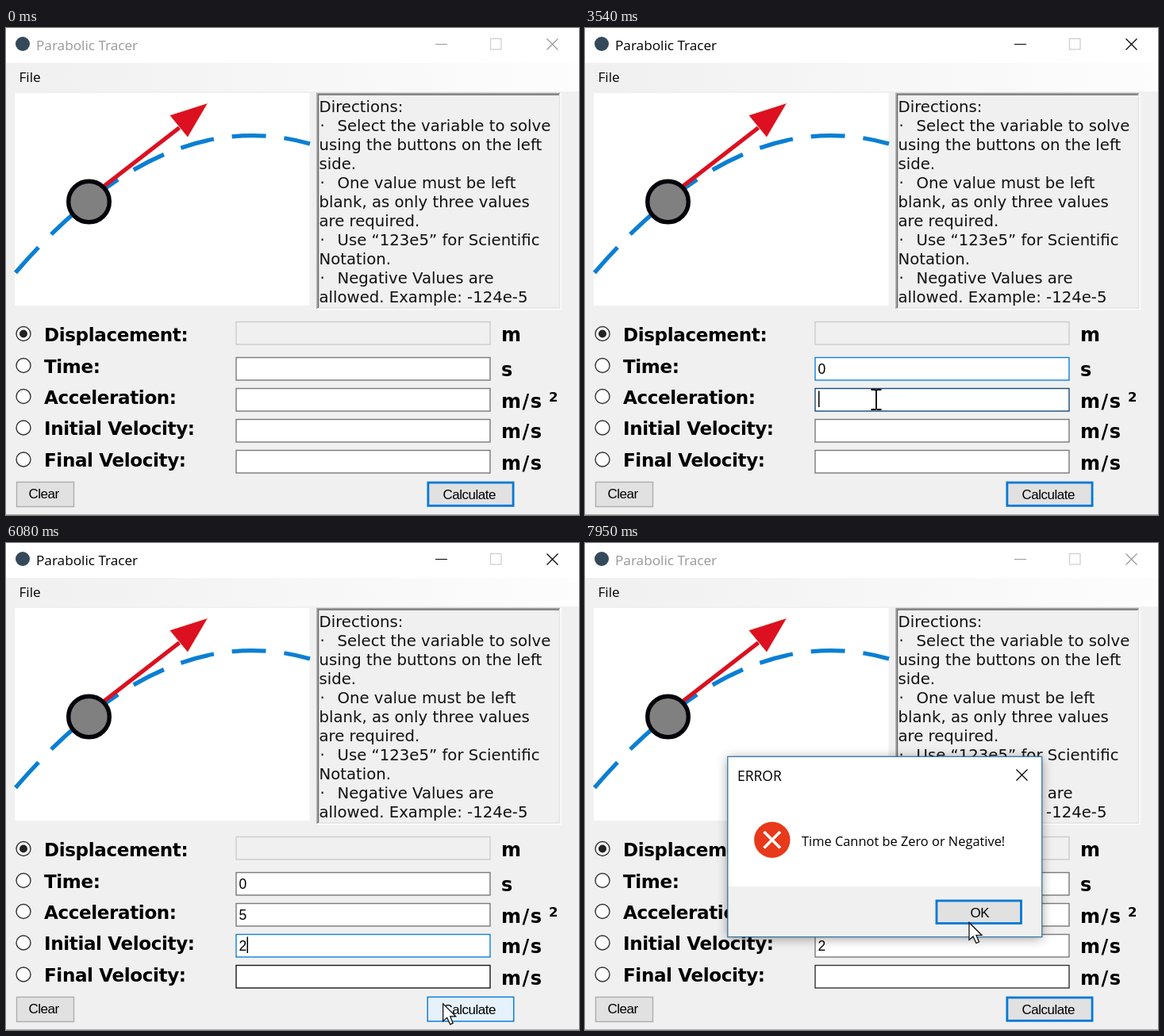
An HTML page for the animation above (8000 ms loop, 722 by 614 pixels).

```html
<!DOCTYPE html>
<html lang="en">
<head>
<meta charset="utf-8">
<title>Parabolic Tracer</title>
<style>
  html, body { margin: 0; width: 722px; height: 614px; overflow: hidden; background: #f0f0f0; }
  svg { display: block; }
  text { white-space: pre; }
  .ui { font: 17.2px "Open Sans", sans-serif; }
  .btn { font: 17px "Liberation Sans", sans-serif; letter-spacing: -.5px; }
  .value { font: 17.5px "Liberation Sans", sans-serif; }
  .note { font: 19.7px "DejaVu Sans", sans-serif; fill: #111; }
  .label { font: bold 23px "DejaVu Sans", sans-serif; letter-spacing: -.35px; }
  .unit { font: bold 24px "DejaVu Sans", sans-serif; letter-spacing: 1.5px; }
  .line { fill: none; stroke-width: 1.2; }
  #panel { filter: drop-shadow(0 2px 7px rgba(0, 0, 0, .4)); }
</style>
</head>
<body>
<svg width="722" height="614" viewBox="0 0 722 614">
  <defs>
    <linearGradient id="menu"><stop stop-color="#f0f0f0"/><stop offset="1" stop-color="#fdfdfd"/></linearGradient>
  </defs>

  <!-- window frame and menu -->
  <rect width="722" height="614" fill="#f0f0f0"/>
  <rect width="722" height="44" fill="#fff"/>
  <rect y="44" width="722" height="36" fill="url(#menu)"/>
  <rect y="613" width="722" height="1" fill="#aaa"/>
  <circle cx="21" cy="20" r="9" fill="#34495a"/>
  <text id="title" class="ui" x="38" y="28">Parabolic Tracer</text>
  <path id="controls" class="line" d="M541 20.5H556M681.5 13.5L695.5 27.5M695.5 13.5L681.5 27.5"/>
  <rect class="line" x="610.5" y="13.5" width="13.5" height="13.5" stroke="#ccc"/>
  <text class="ui" x="16.5" y="67.5">File</text>

  <!-- trajectory picture -->
  <rect x="11" y="82" width="371.5" height="268" fill="#fff"/>
  <path d="M12 308.5Q197.5 93 383 146" fill="none" stroke="#0a7fd4" stroke-width="5.3" stroke-dasharray="43 23"/>
  <path d="M122 200.5L220 124.5" stroke="#dc1020" stroke-width="5.3"/>
  <path d="M254.500 94.500L206 110L229 138Z" fill="#dc1020" stroke="#f6e6d4"/>
  <circle cx="104.5" cy="219" r="25.8" fill="#808080" stroke="#05030a" stroke-width="5.4"/>

  <!-- directions panel -->
  <path d="M392 354V82.5H698" fill="none" stroke="#a0a0a0" stroke-width="1.5"/>
  <path d="M393.5 353V84H697" fill="none" stroke="#696969" stroke-width="1.5"/>
  <path d="M392 354.5H699V82" fill="none" stroke="#fff" stroke-width="1.5"/>
  <path d="M394 353H697.5V84" fill="none" stroke="#e3e3e3" stroke-width="1.5"/>
  <g id="notes"></g>

  <g id="form"></g>

  <rect x="13.5" y="572.5" width="72" height="31" fill="#e1e1e1" stroke="#adadad" stroke-width="1.4"/>
  <text class="btn" x="28.5" y="593">Clear</text>
  <rect id="calc"/>
  <text class="btn" x="550.5" y="594">Calculate</text>
  <rect id="caret" width="1.5" height="20.5"/>

  <g id="dialog">
    <rect id="panel" x="180" y="269.5" width="395.5" height="227" fill="#fff"/>
    <rect x="180" y="433" width="395.5" height="63.5" fill="#f0f0f0"/>
    <rect class="line" x="179.8" y="269.3" width="396" height="227.4" stroke="#2b6f9f"/>
    <text x="192" y="299.5" style="font:17.5px 'Open Sans',sans-serif">ERROR</text>
    <path class="line" d="M543.5 285.5L557.5 299.5M557.5 285.5L543.5 299.5" stroke="#000"/>
    <circle cx="235.8" cy="374.3" r="22.7" fill="#e8391b"/>
    <path d="M225.500 364L246 384.500M246 364L225.500 384.500" stroke="#fff" stroke-width="3.6"/>
    <text x="273" y="382" style="font:16.4px 'Open Sans',sans-serif">Time Cannot be Zero or Negative!</text>
    <rect x="443" y="451" width="106.5" height="28.5" fill="#e1e1e1" stroke="#0078d7" stroke-width="2.8"/>
    <text class="btn" x="485.5" y="472">OK</text>
  </g>

  <circle id="click" r="18" fill="#ffff3c" style="mix-blend-mode:multiply"/>
  <g id="cursor">
    <path id="beam" d="M-6.5 -12H-2Q0 -12 0 -10.5Q0 -12 2 -12H6.5M0 -11V12M-6.5 13H-2Q0 13 0 11.5Q0 13 2 13H6.5" fill="none" stroke="#000" stroke-width="1.8"/>
    <path id="arrow" d="M.5 .5V22.5L5.5 18L9.5 26.5L13 25L9.5 16.5H16.5Z" fill="#fff" stroke="#000" stroke-width="1.2"/>
  </g>
</svg>

<script>
const $ = id => document.getElementById(id);
const set = (el, attrs) => { for (const k in attrs) el.setAttribute(k, attrs[k]); };
const show = (el, on) => el.setAttribute('visibility', on ? 'visible' : 'hidden');
const GRAY = '#7a7a7a', DARK = '#171717', NAVY = '#1b4a78', BLUE = '#0f80d8', FADE = '#3c7ba8';

$('notes').innerHTML = [
  'Directions:', '·Select the variable to solve', 'using the buttons on the left', 'side.',
  '·One value must be left', 'blank, as only three values', 'are required.',
  '·Use “123e5” for Scientific', 'Notation.', '·Negative Values are', 'allowed. Example: -124e-5'
].map((s, i) => {
  const y = 105.5 + 24 * i, line = (x, str) => `<text class="note" x="${x}" y="${y}">${str}</text>`;
  return s[0] === '·' ? line(395.5, '·') + line(417.5, s.slice(1)) : line(394.5, s);
}).join('');

// Editable fields: border colours over time, then the digit and when it is typed.
const rows = [
  { name: 'Displacement:', unit: 'm', y: 370.5, mid: 385.5, unitY: 395 },
  { name: 'Time:', unit: 's', y: 415.5, mid: 425.5, unitY: 438.5, digit: '0', typed: 2620,
    border: [[0, GRAY], [690, DARK], [1020, BLUE], [3700, GRAY]] },
  { name: 'Acceleration:', unit: 'm/s', y: 454.5, mid: 464.5, unitY: 478.5, digit: '5', typed: 4110,
    border: [[0, GRAY], [3330, DARK], [3430, NAVY], [3650, BLUE], [5040, GRAY]] },
  { name: 'Initial Velocity:', unit: 'm/s', y: 493.5, mid: 504, unitY: 516.5, digit: '2', typed: 5490,
    border: [[0, GRAY], [4550, DARK], [4740, NAVY], [4930, BLUE], [6750, FADE], [6950, GRAY]] },
  { name: 'Final Velocity:', unit: 'm/s', y: 532.5, mid: 544, unitY: 556.5, digit: '', typed: 0,
    border: [[0, GRAY], [5760, DARK], [6340, '#333']] }
];

$('form').innerHTML = rows.map((r, i) => `
  <circle cx="22" cy="${r.mid}" r="9" fill="#fff" stroke="#333" stroke-width="1.4"/>
  ${i ? '' : `<circle cx="22" cy="${r.mid}" r="5" fill="#222"/>`}
  <text class="label" x="48" y="${r.mid + 9}">${r.name}</text>
  <rect id="box${i}" x="290" y="${r.y}" width="320" height="28.5"
    fill="${i ? '#fff' : '#f0f0f0'}" stroke="#ccc" stroke-width="1.4"/>
  <text id="value${i}" class="value" x="293.5" y="${r.y + 20.5}">${r.digit || ''}</text>
  <text class="unit" x="624" y="${r.unitY}">${r.unit}</text>`).join('') +
  '<text x="684" y="471" style="font:bold 16.5px \'DejaVu Sans\',sans-serif">2</text>';

// [start, end, steps, x, y, ease-out power]: each move starts where the last one ended.
const moves = [
  [180, 500, 6, 372, 387, 1.5],
  [560, 880, 6, 357, 424, 1.5],
  [3110, 3400, 5, 367, 468, 1.5],
  [4360, 4680, 5, 360, 507.5, 1.5],
  [5190, 5250, 2, 366, 511, 1],
  [5560, 6220, 11, 565, 586, 2],
  [7390, 7950, 10, 483.5, 478, 1.5]
];
const hidden = [[0, 180], [2620, 3110], [4110, 4360], [5490, 5560]];
const clicks = [[1020, 1200, 357, 424], [3420, 3530, 367, 468], [4740, 4860, 357, 507], [6590, 6700, 565, 586]];
// [start, end, x, row]
const carets = [
  [1020, 1760, 294, 1], [2240, 2620, 294, 1], [2620, 3110, 303.5, 1],
  [3430, 4110, 294, 2], [4110, 4360, 303.5, 2],
  [4740, 5490, 294, 3], [5490, 6590, 303.5, 3]
];

const during = (list, t) => list.find(([a, b]) => t >= a && t < b);

function cursorAt(t) {
  let x = 430, y = 622;
  for (const [start, end, steps, tx, ty, power] of moves) {
    if (t < start) break;
    const step = (end - start) / (steps - 1);
    const p = Math.min(1, (Math.floor((t - start) / step + 1e-6) + 1) / steps);
    const u = 1 - (1 - p) ** power;
    x += (tx - x) * u;
    y += (ty - y) * u;
  }
  return [x, y];
}

function draw(t) {
  const dialogOpen = t >= 6700, active = t >= 1020 && !dialogOpen;
  $('title').setAttribute('fill', active ? '#000' : '#999');
  $('controls').setAttribute('stroke', active ? '#000' : '#999');

  rows.forEach((r, i) => {
    if (!i) return;
    $('box' + i).setAttribute('stroke', r.border.filter(b => t >= b[0]).pop()[1]);
    show($('value' + i), t >= r.typed);
  });

  const caret = during(carets, t);
  show($('caret'), caret);
  if (caret) set($('caret'), { x: caret[2], y: rows[caret[3]].y + 3 });

  const [x, y] = cursorAt(t);
  const overField = !dialogOpen && x > 290 && x < 610 && rows.some((r, i) => i && y > r.y && y < r.y + 29);
  $('cursor').setAttribute('transform', `translate(${x} ${y})`);
  $('cursor').setAttribute('display', during(hidden, t) ? 'none' : 'inline');
  show($('beam'), overField);
  show($('arrow'), !overField);

  const click = during(clicks, t);
  show($('click'), click);
  if (click) set($('click'), { cx: click[2], cy: click[3] });

  const hover = active && x > 531 && y > 572, inset = hover ? .7 : 1.4;
  set($('calc'), {
    x: 530.5 + inset, y: 571.7 + inset, width: 110 - 2 * inset, height: 32 - 2 * inset,
    fill: hover ? (t >= 6590 ? '#cce4f7' : '#e5f1fb') : '#e1e1e1',
    stroke: '#0078d7', 'stroke-width': 2 * inset
  });

  // The dialog fades in while growing slightly; its shadow comes last.
  const u = Math.max(0, Math.min(1, (Math.floor((t - 6700) / 60) + 1) / 4));
  set($('dialog'), {
    opacity: u, display: u ? 'inline' : 'none',
    transform: `translate(262 315) scale(${.946 + .054 * u}) translate(-262 -315)`
  });
  $('panel').style.filter = u < 1 ? 'none' : '';
}

const begin = performance.now();
function tick() {
  draw((performance.now() - begin) % 8000);
  requestAnimationFrame(tick);
}
tick();
</script>
</body>
</html>
```
